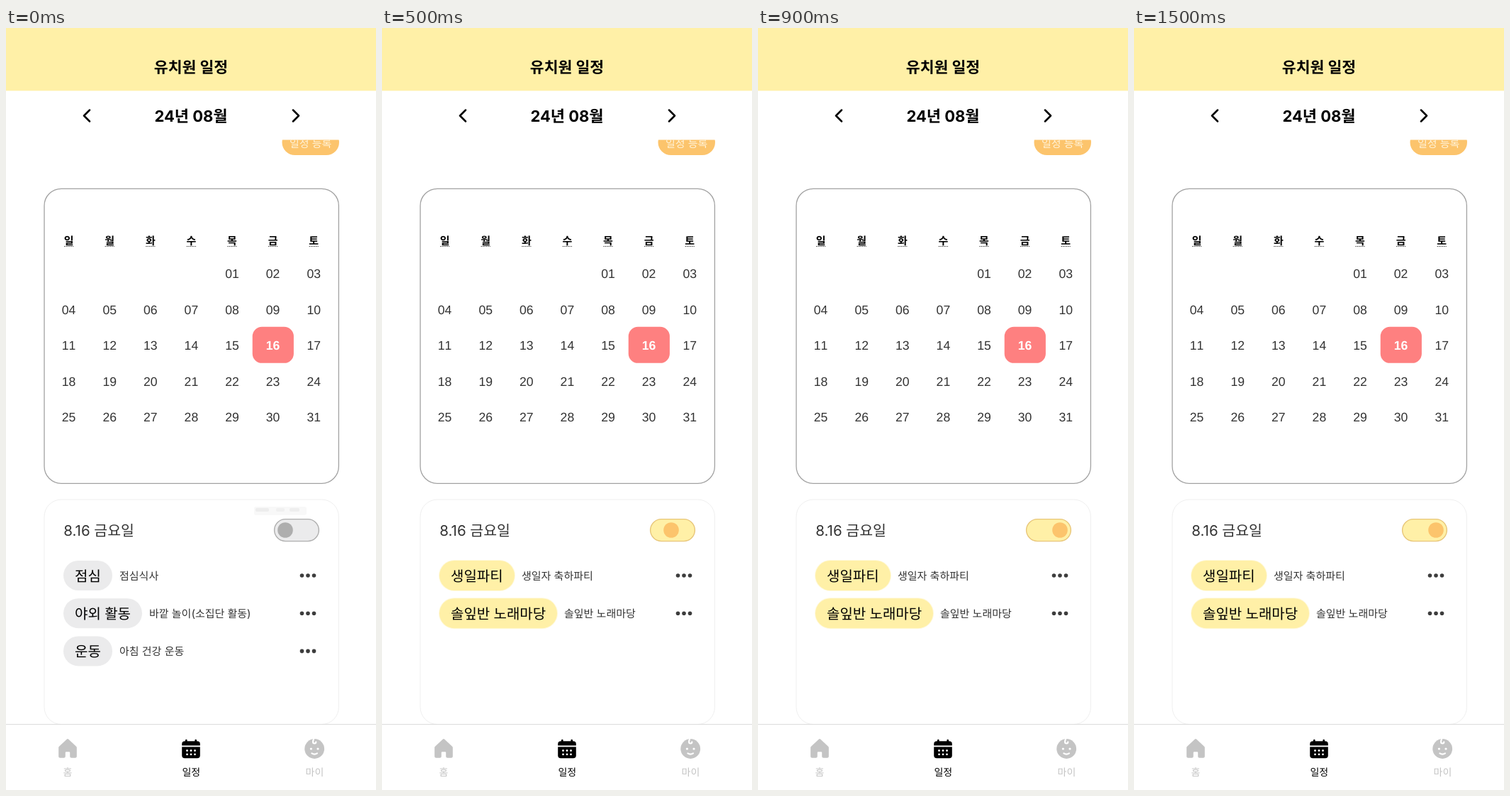
Recreate the animation shown at these times as an HTML page. Size 522 by 1073 pixels, loop 1.6 s.

```html
<!DOCTYPE html>
<html lang="ko">
<head>
<meta charset="utf-8">
<style>
  html, body { margin: 0; height: 100%; overflow: hidden; background: #fff; }
  svg { display: block; width: 100%; height: 100%; }
  text { font-family: Inter, "Noto Sans CJK KR", "Noto Sans CJK", sans-serif; text-rendering: geometricPrecision; }
  .num text { font-family: "Liberation Sans", Arial, sans-serif; font-kerning: none; }
</style>
</head>
<body>
<svg id="stage" viewBox="0 0 522 1073"></svg>
<script>
const YELLOW = '#fff0a7', ORANGE = '#fcc46c', GRAY = '#ebebec', IDLE = '#c4c4c4';

// Text placed by the middle of its glyphs
const text = (s, x, cy, size, fill = '#000', weight = 400, anchor = 'start') =>
  `<text x="${x}" y="${cy + size * .38}" font-size="${size}" fill="${fill}" font-weight="${weight}" text-anchor="${anchor}">${s}</text>`;
const mid = (s, x, cy, size, fill, weight) => text(s, x, cy, size, fill, weight, 'middle');
const box = (x, y, w, h, r, fill, extra = '') =>
  `<rect x="${x}" y="${y}" width="${w}" height="${h}" rx="${r}" fill="${fill}" ${extra}/>`;
const dot = (x, y, r, fill) => `<circle cx="${x}" cy="${y}" r="${r}" fill="${fill}"/>`;
const line = (d, color, width) =>
  `<path d="${d}" fill="none" stroke="${color}" stroke-width="${width}" stroke-linecap="round" stroke-linejoin="round"/>`;
// Icon drawn on a 256 unit grid, centred at x
const icon = (x, body) => `<g transform="translate(${x} 1015) scale(.1337) translate(-128 -128)">${body}</g>`;

function header() {
  return box(0, 0, 522, 88.4, 0, YELLOW) +
    mid('유치원 일정', 261, 54.3, 21.6, '#000', 700) +
    mid('24년 08월', 261, 123.3, 22, '#000', 700) +
    line('M118 115.5L110 123.5L118 131.5M405 115.5L413 123.5L405 131.5', '#000', 2.5) +
    `<clipPath id="cut"><rect y="157.5" width="522" height="60"/></clipPath><g clip-path="url(#cut)">` +
    box(389.5, 143, 80.5, 36, 18, ORANGE) +
    mid('일정 등록', 429.7, 161.8, 15, '#fff3d9') + '</g>';
}

function calendar() {
  const colX = c => 88.6 + c * 57.6;
  let s = box(54, 226.3, 415.4, 415, 24, '#fff', 'stroke="#a2a2a2" stroke-width="1.3"');
  [...'일월화수목금토'].forEach((d, c) => {
    const x = colX(c);
    s += mid(d, x, 299.3, 15, '#000', 700) +
      `<path d="M${x - 6.5} 307.5h13" stroke="#222" stroke-width="1" stroke-dasharray="1.2 1.2"/>`;
  });
  s += box(347.7, 420.8, 58.2, 51, 13.4, '#fe8080') + '<g class="num">';
  for (let day = 1; day <= 31; day++) {
    const cell = day + 3, today = day === 16;
    s += mid(String(day).padStart(2, '0'), colX(cell % 7), 345.7 + Math.floor(cell / 7) * 50.5,
      17.6, today ? '#fff' : '#333', today ? 700 : 400);
  }
  return s + '</g>';
}

function panel() {
  return box(54, 664, 415.4, 316.5, 24, '#fff', 'stroke="#efefef"') +
    text('8.16 금요일', 81.2, 707.7, 20.5, '#333', 400);
}

function nav() {
  let s = box(0, 980, 522, 93, 0, '#fff') + box(0, 980, 522, 1.2, 0, '#dedede');
  // Home
  s += icon(87, `<path d="M224 115.5V208a16 16 0 0 1-16 16h-40a16 16 0 0 1-16-16v-40a8 8 0 0 0-8-8h-32a8 8 0 0 0-8 8v40a16 16 0 0 1-16 16H48a16 16 0 0 1-16-16v-92.5a16 16 0 0 1 5.2-11.8l80-75.5a16 16 0 0 1 21.6 0l80 75.5a16 16 0 0 1 5.2 11.8z" fill="${IDLE}"/>`);
  // Calendar
  s += box(248.2, 1004.2, 25.6, 24, 4, '#000') + line('M254.3 1003.2v3M267.7 1003.2v3', '#000', 2.7) +
    box(248, 1010.4, 26, 1.9, 0, '#fff');
  for (let i = 0; i < 6; i++) s += dot(255.5 + i % 3 * 5.5, i < 3 ? 1017.5 : 1022.8, 1.4, '#fff');
  // Child
  s += icon(435.2, dot(128, 128, 104, IDLE) + dot(92, 128, 12, '#fff') + dot(164, 128, 12, '#fff') +
    line('M100 176A53 53 0 0 0 156 176M122 20Q112 38 112 56a16 16 0 0 0 32 0', '#fff', 16));
  return s + mid('홈', 87, 1047.7, 14, IDLE) + mid('일정', 261.3, 1047.7, 14, '#000', 500) +
    mid('마이', 435.5, 1047.7, 14, IDLE);
}

function list(items, fill, glow) {
  return items.map(([label, note, w], i) => {
    const y = 771 + i * 53.2;
    return (glow ? box(80, y - 22, w + 2, 44, 22, fill, 'opacity=".4"') : '') +
      box(81, y - 21, w, 42, 21, fill) +
      text(label, 97, y + .2, 20, '#000', 500) + text(note, 81 + w + 10, y, 15, '#333') +
      [417.5, 426, 434.5].map(x => dot(x, y, 2.8, '#3d3d3d')).join('');
  }).join('');
}

const toggle = (fill, edge) => box(378.6, 691.6, 62.8, 31, 15.5, fill, `stroke="${edge}" stroke-width="1.4"`);

const stage = document.getElementById('stage');
stage.innerHTML = header() + calendar() + panel() +
  `<g id="hint">${box(350, 674, 74, 12, 3, '#f8f8f8')}${box(352, 676, 19, 5, 2, '#ededed')}` +
  `${box(381, 676, 12, 5, 2, '#f0f0f0')}${box(400, 676, 14, 5, 2, '#eeeeee')}</g>` +
  `<g id="off">${toggle(GRAY, '#aeaeae')}` + list([
    ['점심', '점심식사', 69],
    ['야외 활동', '바깥 놀이(소집단 활동)', 111],
    ['운동', '아침 건강 운동', 69]
  ], GRAY) + `</g><g id="on">${toggle(YELLOW, '#e8c679')}` + list([
    ['생일파티', '생일자 축하파티', 106],
    ['솔잎반 노래마당', '솔잎반 노래마당', 166]
  ], YELLOW, true) + '</g><circle id="knob" cy="707" r="10.8"/>' + nav();

const [hint, off, on, knob] = ['hint', 'off', 'on', 'knob'].map(id => document.getElementById(id));
const show = (el, visible) => el.setAttribute('visibility', visible ? 'visible' : 'hidden');
const start = performance.now();

function draw() {
  const step = Math.floor(Math.max(0, performance.now() - start) / 100) % 16;
  const active = step >= 5;
  show(hint, step === 0);
  show(off, !active);
  show(on, active);
  knob.setAttribute('cx', active ? (step === 5 ? 408 : 426) : 394);
  knob.setAttribute('fill', active ? ORANGE : '#aeaeae');
  requestAnimationFrame(draw);
}
draw();
</script>
</body>
</html>
```
